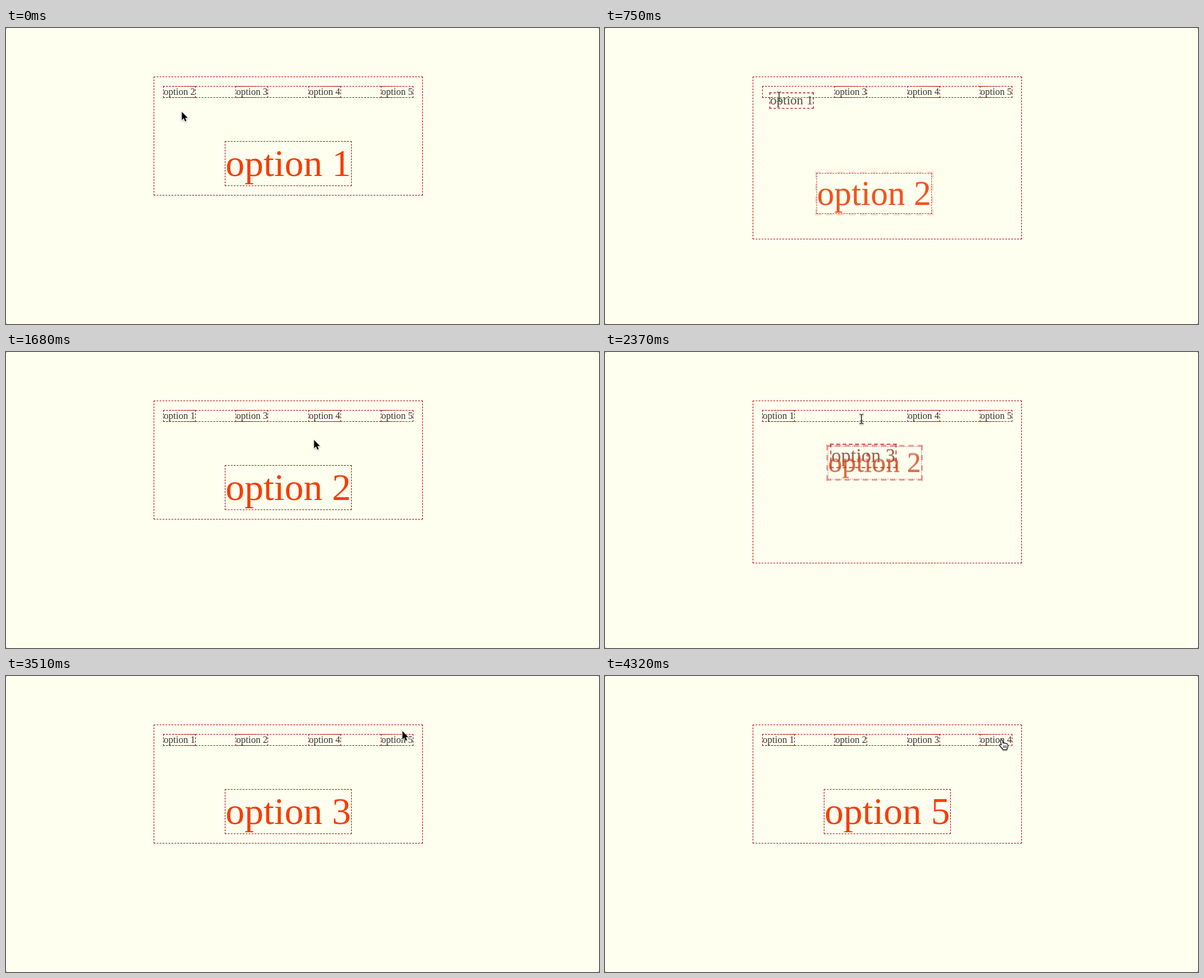
Write an HTML page that moves like this. It is 1000 px wide and 500 px high and loops after 5100 ms.

```html
<!DOCTYPE html>
<html lang="en">
<head>
<meta charset="utf-8">
<title>Option picker</title>
<style>
  html, body { margin: 0; width: 100%; height: 100%; overflow: hidden; background: #555; }
  #stage {
    position: relative; width: 1000px; height: 500px; overflow: hidden;
    background: #fffff0; border-radius: 2px;
    font: 16px/18px "Liberation Serif", "Times New Roman", serif; color: #333;
  }
  #stage > * { position: absolute; }
  .box, .small, .big { outline: 1px dashed #b80000; white-space: pre; transform-origin: 0 0; }
  .big { font-size: 64px; line-height: 74px; color: #f73e03; }
  #panel { left: 250px; top: 83px; width: 452px; }
  #list { left: 266px; top: 99px; width: 420px; height: 18px; }
  #cursor { left: 0; top: 0; width: 40px; height: 40px; overflow: visible; filter: drop-shadow(0 1px 1px #0005); }
</style>
</head>
<body>
<div id="stage">
  <div id="panel" class="box"></div>
  <div id="list" class="box"></div>
  <svg id="cursor">
    <path id="arrow" d="M.5 .5V14.6L3.8 11.5 6 16.8 8.3 15.8 6.1 10.7H10.4Z"
      fill="#000" stroke="#fff" stroke-width="1.6" paint-order="stroke"/>
    <g id="beam" fill="none">
      <path d="M-3 -8Q0 -8 .5 -6.5Q1 -8 4 -8M.5 -6.5V6.5M-3 8Q0 8 .5 6.5Q1 8 4 8M-1.5 3H2.5"
        stroke="#fff" stroke-width="2.4"/>
      <path d="M-3 -8Q0 -8 .5 -6.5Q1 -8 4 -8M.5 -6.5V6.5M-3 8Q0 8 .5 6.5Q1 8 4 8M-1.5 3H2.5"
        stroke="#111" stroke-width="1.2"/>
    </g>
    <g id="hand" stroke="#111" stroke-linejoin="round" stroke-linecap="round">
      <path d="M-3 1.4C-3.2 -.8 -.3 -1 .2 1.2L1.2 5.6C1.6 4.5 3.8 4.6 4 6C4.5 5.1 6.5 5.3 6.7 6.7
        C7.3 6 9.2 6.3 9.2 8V11C9.2 13.4 7.8 14 7.6 16.6H1.2C.6 14.4 -2.6 12 -4.3 9.4
        C-5.2 7.8 -3.4 6.8 -1.6 8.4Z" fill="#fff" stroke-width="1.2"/>
      <path d="M2 9.5V13.5M4.2 9.5V13.5M6.4 9.5V13.5" stroke-width=".9"/>
    </g>
  </svg>
</div>
<script>
const LOOP = 5100, STEP = 30, FLIGHT = 500;
const SMALL = { w: 52.9, h: 18 }, BIG = { w: 211.6, h: 74 };
const LIST_X = 266, LIST_W = 420, LIST_Y = 99, BIG_Y = 192;
const OPTIONS = [1, 2, 3, 4, 5];
const CLICKS = [
  { at: 497, from: 1, to: 2 },
  { at: 2304, from: 2, to: 3 },
  { at: 3793, from: 3, to: 5 },
];
// time, x, y of the pointer
const PATH = [
  [0, 296, 141], [60, 296, 141], [330, 293, 116], [1320, 293, 116],
  [1680, 519, 148], [1830, 532, 150], [2190, 432, 113], [2970, 432, 113],
  [3240, 540, 138], [3450, 662, 106], [3570, 674, 79], [3720, 670, 108], [LOOP, 670, 108],
];

const $ = id => document.getElementById(id);
const cursor = $('cursor'), panel = $('panel');
const lerp = (a, b, p) => a + (b - a) * p;
const cubicOut = x => 1 - (1 - x) ** 3;

const makeRow = cls => Object.fromEntries(OPTIONS.map(n => {
  const el = document.createElement('div');
  el.className = cls;
  el.textContent = 'option ' + n;
  $('stage').insertBefore(el, cursor);
  return [n, el];
}));
const small = makeRow('small'), big = makeRow('big');

function slot(n, selected) {
  const i = OPTIONS.filter(o => o !== selected).indexOf(n);
  return { x: LIST_X + i * (LIST_W - SMALL.w) / 3, y: LIST_Y, ...SMALL };
}
const center = row => ({ x: 476 - BIG.w / 2, y: BIG_Y + row * BIG.h, ...BIG });

function show(el, at) {
  el.style.cssText = `left:${at.x}px;top:${at.y}px`;
}

// t = 1 rests at home, t = 0 covers the other rectangle
function fly(el, home, away, t) {
  show(el, home);
  const u = 1 - t;
  el.style.opacity = t;
  el.style.transform = `translate(${u * (away.x - home.x)}px,${u * (away.y - home.y)}px) ` +
    `scale(${t + u * away.w / home.w},${t + u * away.h / home.h})`;
}

function drawOptions(click, p) {
  const moving = p < 1, { from, to } = click;
  for (const n of OPTIONS) {
    small[n].style.display = big[n].style.display = 'none';
    if (n === to) continue;
    const now = slot(n, to);
    if (n !== from) now.x = lerp(slot(n, from).x, now.x, p);
    show(small[n], now);
  }
  panel.style.height = (moving ? 273 : 199) + 'px';
  if (!moving) return show(big[to], center(0));

  const oldSlot = slot(to, from), newSlot = slot(from, to);
  fly(small[from], newSlot, center(0), p);
  fly(big[from], center(0), newSlot, 1 - p);
  fly(small[to], oldSlot, center(1), 1 - p);
  fly(big[to], center(1), oldSlot, p);
}

function drawCursor(t, selected, moving) {
  const i = PATH.findIndex(k => k[0] > t);
  const [t0, x0, y0] = PATH[i - 1], [t1, x1, y1] = PATH[i];
  const p = (t - t0) / (t1 - t0), x = lerp(x0, x1, p), y = lerp(y0, y1, p);
  const over = OPTIONS.some(n => {
    const s = slot(n, selected);
    return n !== selected && x >= s.x && x <= s.x + s.w && y >= s.y && y <= s.y + s.h;
  });
  const kind = moving ? 'beam' : over ? 'hand' : 'arrow';
  for (const id of ['arrow', 'beam', 'hand']) $(id).style.display = id === kind ? '' : 'none';
  cursor.style.transform = `translate(${x}px,${y}px)`;
}

function draw(t) {
  const click = CLICKS.findLast(c => c.at <= t) || { at: -FLIGHT, from: 2, to: 1 };
  const x = Math.min(1, (t - click.at) / FLIGHT);
  drawOptions(click, cubicOut(x));
  drawCursor(t, click.to, x < 1);
}

const start = performance.now();
function tick() {
  const t = (performance.now() - start) % LOOP;
  draw(Math.floor(t / STEP) * STEP);
  requestAnimationFrame(tick);
}
tick();
</script>
</body>
</html>
```
